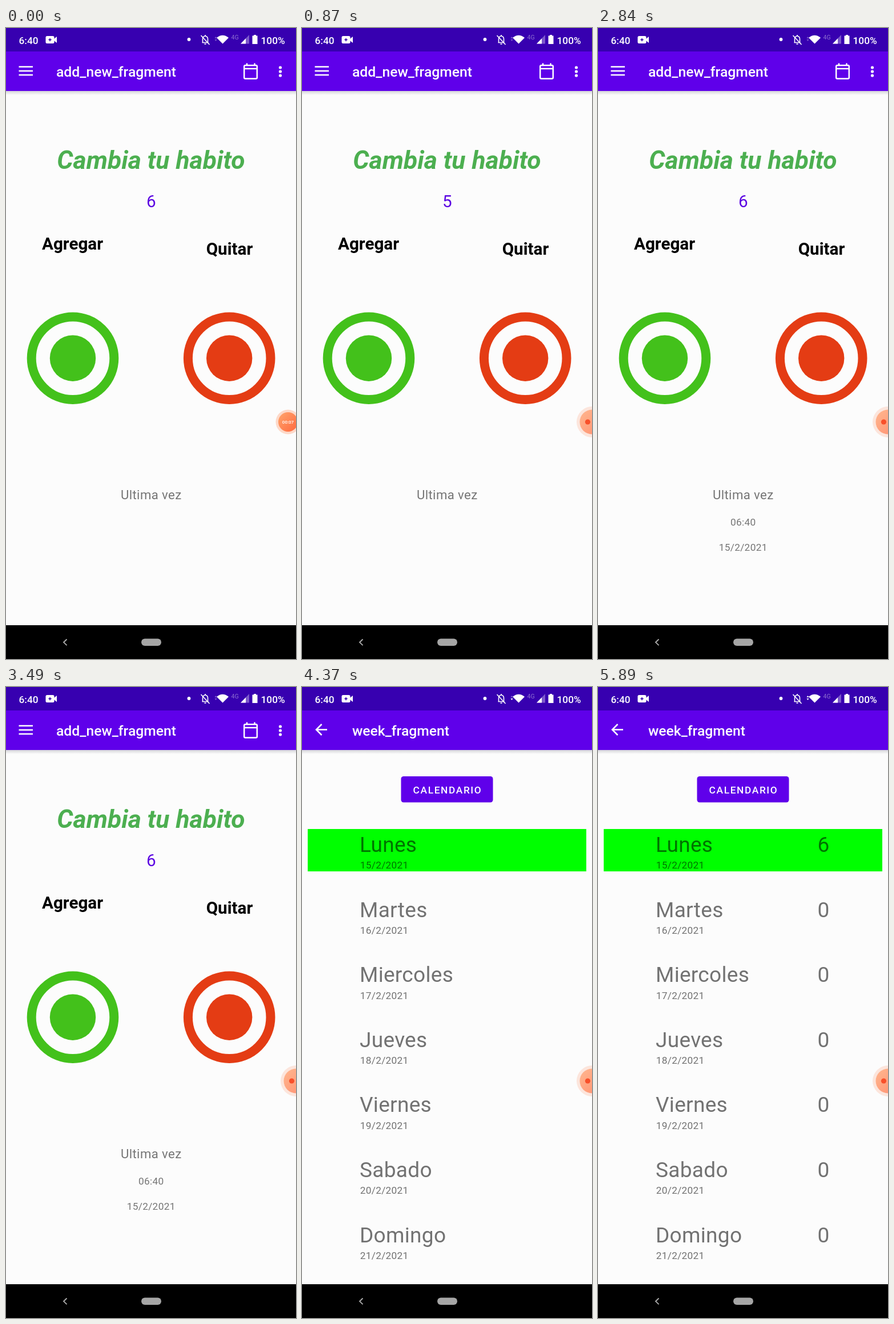
Animation of 508 by 1102 pixels, one loop 6.1 s. Source, as an HTML page:

```html
<!DOCTYPE html>
<html lang="es">
<head>
<meta charset="utf-8">
<style>
  html, body { margin: 0; width: 100%; height: 100%; overflow: hidden; background: #fcfcfc; }
  svg { display: block; width: 508px; height: 1102px; font-family: Roboto, sans-serif; }
  .mid { text-anchor: middle; }
  .medium { font-weight: 500; fill: #fff; }
  .title { font-size: 24.7px; }
  .small { font-size: 17.3px; }
  .body { letter-spacing: .0178em; }
  .gray { fill: #757575; }
  .day { font-size: 37.05px; }
  .bold { font-size: 29.65px; font-weight: 700; }
  .line { fill: none; stroke: #fff; stroke-width: 2.5; }
</style>
</head>
<body>
<svg viewBox="0 0 508 1102">
  <defs>
    <linearGradient id="shade" x2="0" y2="1">
      <stop stop-color="#d4d4d8"/><stop offset="1" stop-color="#fcfcfc"/>
    </linearGradient>
    <linearGradient id="orange" x2="1" y2="1">
      <stop stop-color="#ffa56c"/><stop offset="1" stop-color="#ff683f"/>
    </linearGradient>
    <linearGradient id="peach" x2="1" y2="1">
      <stop stop-color="#ffb78f"/><stop offset="1" stop-color="#ff8f70"/>
    </linearGradient>
  </defs>
  <rect width="508" height="1102" fill="#fcfcfc"/>
  <rect y="110" width="508" height="7" fill="url(#shade)"/>
  <rect width="508" height="110" fill="#5f00ea"/>
  <rect width="508" height="41" fill="#3700b0"/>

  <!-- status bar -->
  <text class="medium small" x="22.5" y="27.5">6:40</text>
  <text class="medium small" x="446.5" y="27.5">100%</text>
  <text x="394.5" y="19.5" font-size="10.5" fill="#8d6fd0">4G</text>
  <g fill="#fff">
    <rect x="69.5" y="14" width="15" height="13" rx="2.5"/>
    <path d="M84 19l5-4v11l-5-4z"/>
    <path d="M77 17l1 2.5 2.5 1-2.5 1-1 2.5-1-2.5-2.5-1 2.5-1z" fill="#3700b0"/>
    <circle cx="320.500" cy="20" r="2.900"/>
    <path d="M369 17Q379.500 8.500 390 17L379.500 27.500z"/>
    <path d="M426 12v15.500h-15z" opacity=".35"/>
    <path d="M420 18.200v9.300h-9z"/>
    <path d="M434 12h4v1.500h2.500v14.500h-9v-14.500h2.500z"/>
    <path id="up" d="M365.500 18l2-3 2 3z"/>
    <path id="down" d="M365.500 20l2 3 2-3z"/>
  </g>
  <g class="line" style="stroke-width:1.6">
    <path d="M343.500 25.500h11M344.500 25v-6q0-4 4.500-5q4.500 1 4.500 5v6M349 12v2"/>
    <path d="M341.500 13l15 16"/>
    <path d="M347.500 28h3"/>
  </g>

  <g id="home">
    <path class="line" d="M22.500 67.800h24.500M22.500 75h24.500M22.500 82h24.500"/>
    <text class="medium title" x="88" y="85">add_new_fragment</text>
    <circle id="ripple" cx="428.500" cy="76" r="24.500" fill="#fff" opacity=".22"/>
    <g class="line">
      <rect x="417.200" y="65.200" width="22.600" height="23.200" rx="2"/>
      <path d="M417 71h23M422 61.500v4M435.500 61.500v4"/>
    </g>
    <g fill="#fff">
      <circle cx="480.500" cy="69" r="2.600"/>
      <circle cx="480.500" cy="76" r="2.600"/>
      <circle cx="480.500" cy="83" r="2.600"/>
    </g>
    <text class="mid" x="254" y="245.500" font-size="44.450" font-weight="700" font-style="italic" fill="#4caf50">Cambia tu habito</text>
    <text id="count" class="mid body" x="254.500" y="313" font-size="29.650" fill="#5b04e2">6</text>
    <text class="mid bold" x="116.500" y="387">Agregar</text>
    <text class="mid bold" x="391.500" y="396">Quitar</text>
    <g fill="#43c11b" stroke="#43c11b">
      <circle cx="117" cy="576.700" r="72.300" fill="none" stroke-width="16"/>
      <circle cx="117" cy="576.700" r="40.200" stroke="none"/>
    </g>
    <g fill="#e43c14" stroke="#e43c14">
      <circle cx="391.200" cy="576.700" r="72.300" fill="none" stroke-width="16"/>
      <circle cx="391.200" cy="576.700" r="40.200" stroke="none"/>
    </g>
    <text class="mid body gray" x="254.300" y="823" font-size="22.200">Ultima vez</text>
    <g id="last" class="mid body gray small">
      <text x="254.200" y="869">06:40</text>
      <text x="254.200" y="912.500">15/2/2021</text>
    </g>
  </g>

  <g id="week">
    <path class="line" d="M44 74.500h-18M34.500 65l-9.500 9.500 9.500 9.500"/>
    <text class="medium title" x="88" y="85">week_fragment</text>
    <rect x="173.500" y="156" width="161" height="45.500" rx="4.500" fill="#5f00ea"/>
    <text class="medium small mid" x="255" y="186" letter-spacing="1.65">CALENDARIO</text>
    <rect x="10" y="248" width="488" height="74" fill="#0f0"/>
    <g id="days" class="body" fill-opacity=".55"></g>
    <g id="totals" class="body mid day" fill-opacity=".55"></g>
  </g>

  <!-- recorder bubble -->
  <g id="timer">
    <circle cx="494" cy="688" r="21.500" fill="#fdd9c9"/>
    <circle cx="494" cy="688" r="17" fill="url(#orange)"/>
    <text class="mid" x="494" y="691" font-size="8" font-weight="500" fill="#fff">00:07</text>
  </g>
  <g id="docked">
    <circle cx="508" cy="688" r="27" fill="#fce5dc"/>
    <circle cx="508" cy="688" r="21.500" fill="url(#peach)"/>
    <circle cx="500.500" cy="688" r="4.600" fill="#f8502a"/>
  </g>

  <rect y="1043" width="508" height="59"/>
  <path d="M106.500 1067.500l-5.500 5.300 5.500 5.300" fill="none" stroke="#b0b0b0" stroke-width="1.800"/>
  <rect x="237" y="1066.500" width="35" height="12.500" rx="6.250" fill="#a6a6a6"/>
</svg>
<script>
const LOOP = 6100;
const $ = id => document.getElementById(id);
const show = (id, on) => $(id).style.display = on ? "" : "none";

function addText(parent, x, y, text, cls = "") {
  const node = document.createElementNS("http://www.w3.org/2000/svg", "text");
  node.setAttribute("x", x);
  node.setAttribute("y", y);
  node.setAttribute("class", cls);
  node.textContent = text;
  $(parent).append(node);
}

["Lunes", "Martes", "Miercoles", "Jueves", "Viernes", "Sabado", "Domingo"].forEach((name, i) => {
  const y = 288 + 113.6 * i;
  addText("days", 101, y, name, "day");
  addText("days", 101.8, y + 29.3, `${15 + i}/2/2021`, "small");
  addText("totals", 395.3, y, i ? 0 : 6);
});

function draw(t) {
  show("home", t < 4370);
  show("week", t >= 4370);
  show("timer", t < 440);
  show("docked", t >= 440);
  show("last", t >= 1530);
  show("ripple", t >= 4150);
  show("totals", t >= 4580);
  $("count").textContent = t >= 650 && t < 1530 ? 5 : 6;
  $("up").style.opacity = t >= 5680 ? 1 : .35;
  $("down").style.opacity = t >= 4150 ? 1 : .35;
}

const start = performance.now();
function tick() {
  draw((performance.now() - start) % LOOP);
  requestAnimationFrame(tick);
}
tick();
</script>
</body>
</html>
```
